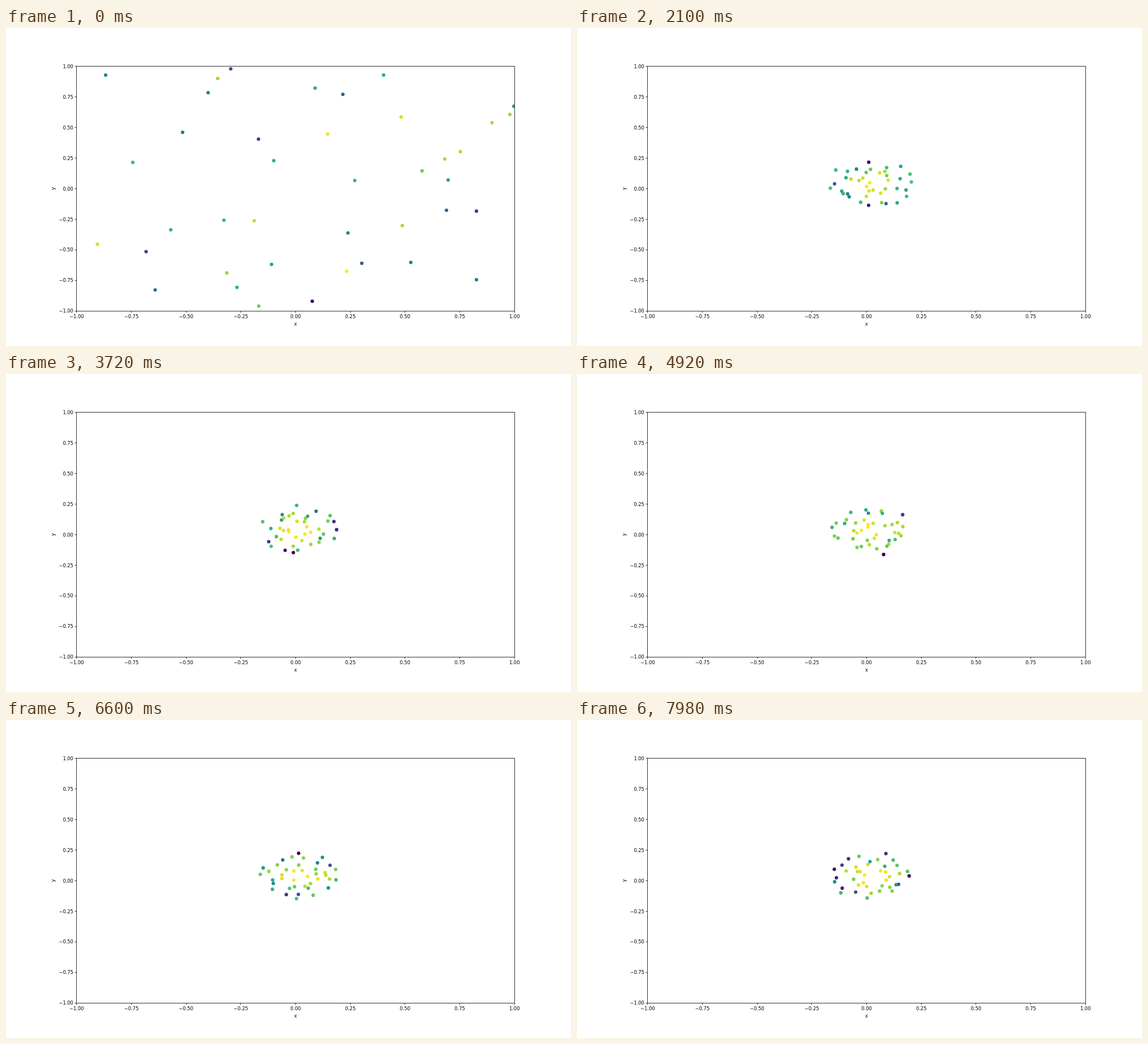
Write an HTML page with a canvas that moves like this. It is 998 px wide and 561 px high and loops after 8000 ms.

```html
<!DOCTYPE html>
<html lang="en">
<head>
<meta charset="utf-8">
<title>Swarm scatter plot</title>
<style>
html, body { margin: 0; width: 100%; height: 100%; overflow: hidden; background: #fff; }
canvas { display: block; }
</style>
</head>
<body>
<canvas id="stage" width="998" height="561"></canvas>
<script>
const ctx = document.getElementById('stage').getContext('2d');
const LOOP = 8000, STEP = 60;
const box = { left: 124.75, right: 898.2, top: 67.32, bottom: 499.29 };
const midX = (box.left + box.right) / 2, midY = (box.top + box.bottom) / 2;
const unitX = (box.right - box.left) / 2, unitY = (box.bottom - box.top) / 2;

// Starting swarm: x and y in pixels, colour value in percent.
const start = [
  176, 83, 45, 397, 72, 26, 374, 89, 85, 357, 114, 43, 312, 184, 38,
  446, 196, 20, 224, 237, 68, 473, 234, 65, 546, 106, 63, 595, 117, 33,
  667, 83, 64, 568, 187, 98, 698, 157, 94, 897, 138, 55, 890, 152.5, 84,
  858.5, 167, 87, 802.5, 218, 87, 775, 231, 87, 735, 252, 78, 781, 268, 59,
  616, 269, 68, 778, 321.5, 34, 831, 323, 17, 700, 348.5, 87, 604, 361.5, 45,
  291, 356, 66, 385, 339, 68, 438.5, 340, 91, 161.5, 381.5, 94, 247.5, 394.5, 20,
  263.5, 462, 39, 390, 432, 84, 408, 457.5, 64, 469, 417, 60, 446.5, 490.5, 78,
  541, 482, 0, 601.5, 429, 100, 628.5, 415, 28, 715, 413.5, 43, 831, 444, 43
];

const stops = ['440154', '482878', '3e4989', '31688e', '26828e',
  '1f9e89', '35b779', '6ece58', 'b5de2b', 'fde725']
  .map(hex => [0, 2, 4].map(i => parseInt(hex.slice(i, i + 2), 16)));

function viridis(value) {
  const pos = Math.max(0, Math.min(1, value)) * (stops.length - 1);
  const i = Math.min(stops.length - 2, Math.floor(pos));
  const mix = stops[i].map((c, k) => Math.round(c + (stops[i + 1][k] - c) * (pos - i)));
  return `rgb(${mix})`;
}

function random(seed) {
  return () => {
    seed = (seed * 16807) % 2147483647;
    return seed / 2147483647;
  };
}

function makeSwarm() {
  const rnd = random(4217);
  const swarm = [];
  for (let i = 0; i < start.length; i += 3) {
    swarm.push({
      x: (start[i] - midX) / unitX,
      y: (midY - start[i + 1]) / unitY,
      first: start[i + 2] / 100,
      phase: rnd() * 2 * Math.PI,
      rate: 0.8 + rnd() * 1.2
    });
  }
  return swarm;
}

const CENTRE = { x: 0.02, y: 0.037 }, RADIUS = 0.19, PULL = 1.7, WANDER = 0.09;

// Pull to the centre, soft mutual repulsion and a slow drift.
function advance(swarm, t, dt) {
  const push = PULL * RADIUS * RADIUS / (swarm.length - 1);
  const moves = swarm.map(p => {
    const angle = p.phase + p.rate * t;
    const settle = WANDER * (1 - Math.exp(-t));
    let vx = PULL * (CENTRE.x - p.x) + settle * Math.cos(angle);
    let vy = PULL * (CENTRE.y - p.y) + settle * Math.sin(angle);
    for (const q of swarm) {
      const dx = p.x - q.x, dy = p.y - q.y;
      const near = dx * dx + dy * dy + 0.0006;
      vx += push * dx / near;
      vy += push * dy / near;
    }
    return [vx * dt, vy * dt];
  });
  swarm.forEach((p, i) => { p.x += moves[i][0]; p.y += moves[i][1]; });
}

// Outer dots tend to be dark, inner ones bright; scaled to the full range.
function snapshot(swarm, t) {
  const keep = Math.exp(-t / 0.5);
  const raw = swarm.map(p => {
    const r = Math.min(1.15, Math.hypot(p.x - CENTRE.x, p.y - CENTRE.y) / RADIUS);
    const wave = 0.5 + 0.5 * Math.sin(p.phase * 3 + p.rate * t);
    return keep * p.first + (1 - keep) * (1 - r * r * (0.25 + 0.75 * wave * wave));
  });
  const low = Math.min(...raw), span = Math.max(...raw) - low;
  return swarm.map((p, i) => ({
    x: midX + p.x * unitX,
    y: midY - p.y * unitY,
    color: viridis((raw[i] - low) / span)
  }));
}

function simulate() {
  const swarm = makeSwarm(), states = [], parts = 6;
  const dt = STEP / 1000 / parts;
  for (let ms = 0; ms < LOOP; ms += STEP) {
    states.push(snapshot(swarm, ms / 1000));
    for (let k = 0; k < parts; k++) advance(swarm, ms / 1000 + k * dt, dt);
  }
  return states;
}

const snap = v => Math.floor(v) + 0.5;

function line(x1, y1, x2, y2) {
  ctx.beginPath();
  ctx.moveTo(x1, y1);
  ctx.lineTo(x2, y2);
  ctx.stroke();
}

function drawAxes() {
  ctx.strokeStyle = ctx.fillStyle = '#000';
  ctx.lineWidth = 0.8;
  const left = snap(box.left), top = snap(box.top);
  const right = snap(box.right), bottom = snap(box.bottom);
  ctx.strokeRect(left, top, right - left, bottom - top);

  ctx.font = '8.33px "DejaVu Sans", sans-serif';
  for (let i = -4; i <= 4; i++) {
    const label = (i < 0 ? '\u2212' : '') + Math.abs(i / 4).toFixed(2);
    const x = midX + unitX * i / 4, y = midY - unitY * i / 4;
    line(snap(x), bottom, snap(x), bottom + 3);
    line(left, snap(y), left - 3, snap(y));
    ctx.textAlign = 'center';
    ctx.fillText(label, x, 512.3);
    ctx.textAlign = 'right';
    ctx.fillText(label, box.left - 5.83, y + 3.2);
  }
  ctx.textAlign = 'center';
  ctx.fillText('x', midX, 525.3);
  ctx.save();
  ctx.translate(86.3, midY);
  ctx.rotate(-Math.PI / 2);
  ctx.fillText('y', 0, 0);
  ctx.restore();
}

function drawDots(dots) {
  ctx.save();
  ctx.beginPath();
  ctx.rect(box.left, box.top, box.right - box.left, box.bottom - box.top);
  ctx.clip();
  for (const dot of dots) {
    ctx.fillStyle = dot.color;
    ctx.beginPath();
    ctx.arc(dot.x, dot.y, 3.1, 0, 2 * Math.PI);
    ctx.fill();
  }
  ctx.restore();
}

const states = simulate();
const begin = performance.now();

function render() {
  const t = (performance.now() - begin) % LOOP;
  ctx.fillStyle = '#fff';
  ctx.fillRect(0, 0, 998, 561);
  drawDots(states[Math.floor(t / STEP)]);
  drawAxes();
  requestAnimationFrame(render);
}
render();
</script>
</body>
</html>
```
